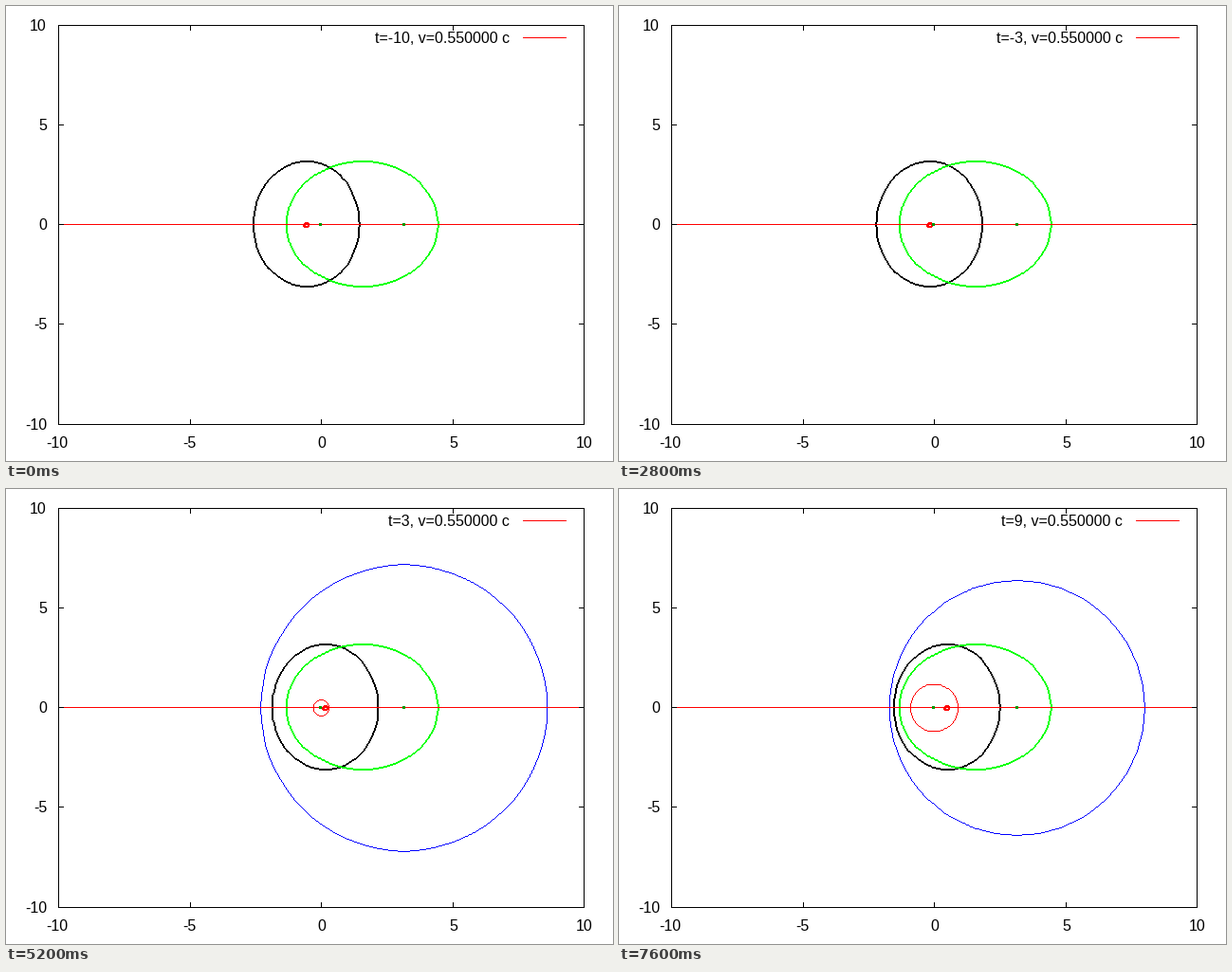
Recreate the animation shown at these times as a matplotlib script. Size 640 by 480 pixels, loop 8 s.

```python
import matplotlib.pyplot as plt
import numpy as np
from matplotlib.animation import FuncAnimation

WIDTH, HEIGHT = 640, 480
PX = 0.72                      # points per pixel at 100 dpi
UNIT = 27.7                    # pixels per plot unit
X0, Y0, ZERO_ROW = 331.95, 230.5, 230
LEFT, RIGHT, TOP, BOTTOM = 55, 609, 20, 441

BLACK, RED, LIME = (0, 0, 0), (255, 0, 0), (0, 255, 0)
BLUE, GREEN = (0, 0, 255), (0, 153, 0)

SPEED = 0.55
GAMMA2 = 1 / (1 - SPEED ** 2)
LENGTH = 2.0
REST_A = LENGTH * UNIT
ORBIT_A = LENGTH * GAMMA2 * UNIT
SEMI_B = LENGTH * np.sqrt(GAMMA2) * UNIT
FOCUS_X = X0 + 2 * SPEED * ORBIT_A
ANGLE = np.linspace(0, 2 * np.pi, 73)

plt.rcParams["font.family"] = "Liberation Sans"
plt.rcParams["axes.unicode_minus"] = False

fig = plt.figure(figsize=(6.4, 4.8), dpi=100, facecolor="white")
ax = fig.add_axes([0, 0, 1, 1])
ax.axis("off")


def segment(canvas, start, end, color, width=1):
    """Draw an aliased line; extra width goes across its steeper axis."""
    (xa, ya), (xb, yb) = start, end
    dx, dy = abs(xb - xa), abs(yb - ya)
    count = int(max(dx, dy)) + 1
    xs = np.rint(np.linspace(xa, xb, count)).astype(int)
    ys = np.rint(np.linspace(ya, yb, count)).astype(int)
    for k in range(width):
        if dx >= dy:
            canvas[ys - k, xs] = color
        else:
            canvas[ys, xs - k] = color


def ring(canvas, cx, cy, a, b, color, width=1):
    points = np.rint(np.column_stack((cx + a * np.cos(ANGLE),
                                      cy + b * np.sin(ANGLE))))
    for start, end in zip(points[:-1], points[1:]):
        segment(canvas, start, end, color, width)


def tick_positions():
    for value in range(-10, 11, 5):
        part = (value + 10) / 20
        x = int(LEFT + (RIGHT - LEFT) * part + 0.5)
        y = int(BOTTOM - (BOTTOM - TOP) * part)
        yield value, x, y


def draw_border(canvas):
    for y in (TOP, BOTTOM):
        segment(canvas, (LEFT, y), (RIGHT, y), BLACK)
    for x in (LEFT, RIGHT):
        segment(canvas, (x, TOP), (x, BOTTOM), BLACK)
    for _, x, y in tick_positions():
        for edge, step in ((LEFT, 5), (RIGHT, -5)):
            segment(canvas, (edge, y), (edge + step, y), BLACK)
        for edge, step in ((TOP, 5), (BOTTOM, -5)):
            segment(canvas, (x, edge), (x, edge + step), BLACK)


def render(t):
    canvas = np.full((HEIGHT, WIDTH, 3), 255, dtype=np.uint8)
    center = X0 + SPEED * 0.1 * t * UNIT
    radius = 0.1 * t * UNIT
    if t >= 0:
        incoming = ORBIT_A * 2 + 0.5 - radius
        ring(canvas, FOCUS_X, Y0, incoming, incoming, BLUE)
    ring(canvas, center, ZERO_ROW, REST_A + 0.5, SEMI_B, BLACK, 2)
    ring(canvas, X0 + SPEED * ORBIT_A, ZERO_ROW, ORBIT_A + 0.5, SEMI_B,
         LIME, 2)
    segment(canvas, (LEFT, ZERO_ROW), (RIGHT, ZERO_ROW), RED)
    segment(canvas, (545, 33), (590, 33), RED)
    if t >= 0:
        ring(canvas, X0, Y0, radius, radius, RED)
    ring(canvas, center, ZERO_ROW + 1, 2.3, 2.3, RED, 2)
    for x in (331, 419):
        canvas[ZERO_ROW - 1:ZERO_ROW + 2, x - 1:x + 2] = GREEN
    draw_border(canvas)
    return canvas


def label(x, y, text, align):
    return ax.text(x, y, text, fontsize=16 * PX, ha=align, va="baseline",
                   color="black")


picture = ax.imshow(render(-10), extent=(-0.5, WIDTH - 0.5, HEIGHT - 0.5, -0.5),
                    interpolation="nearest", aspect="auto")
for number, tick_x, tick_y in tick_positions():
    label(tick_x if number >= 0 else tick_x - 1.5, 465.5, str(number), "center")
    label(42.5, tick_y + 5.5, str(number), "right")
title = label(530.5, 38.6, "", "right")


def update(frame):
    t = frame - 10
    picture.set_data(render(t))
    title.set_text(f"t={t}, v={SPEED:.6f} c")
    return picture, title


anim = FuncAnimation(fig, update, frames=20, interval=400, repeat=True,
                     repeat_delay=0, blit=False)
plt.show()
```
